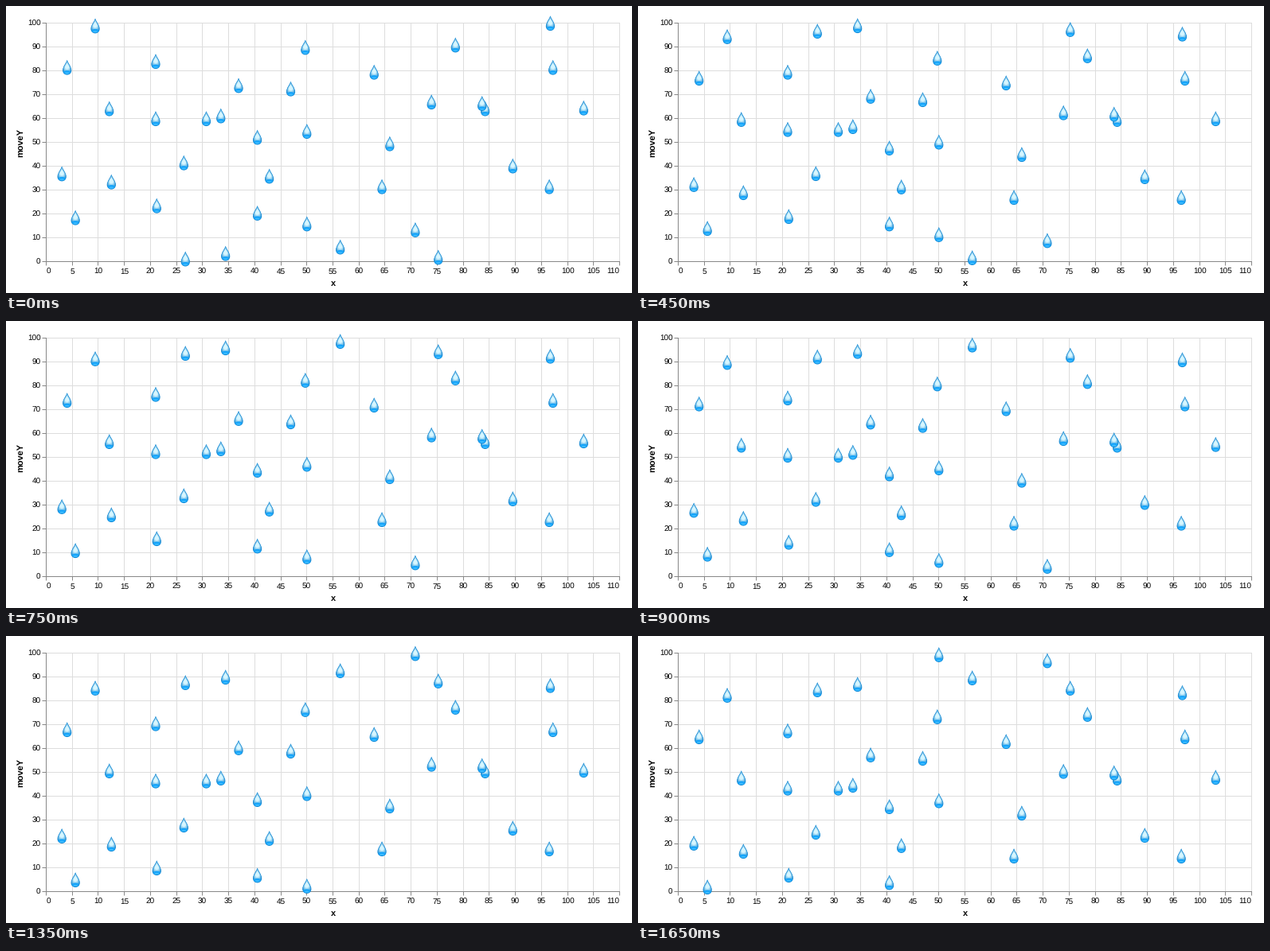
A matplotlib script for the animation above (1670 ms loop, 786 by 361 pixels).

```python
import numpy as np
import matplotlib.pyplot as plt
from matplotlib.animation import FuncAnimation
from matplotlib.collections import LineCollection, PathCollection
from matplotlib.colors import to_rgb
from matplotlib.path import Path
from matplotlib.transforms import Affine2D

W, H, DPI = 786, 361, 100
TICK_MS, STEP_MS, LOOP_MS = 10, 150, 1670
LEFT, RIGHT, TOP, BOTTOM = 50.5, 770.5, 21.5, 321.5
X_MAX, Y_MAX = 110, 100
FALL = 1.5  # y units lost in each step

# Where each drop starts, in chart units
DROPS = np.array([
    (3.0, 36.7), (4.0, 81.3), (5.6, 18.3), (9.4, 98.7), (12.1, 64.0), (12.5, 33.3),
    (21.0, 83.8), (21.0, 59.8), (21.2, 23.3), (26.4, 41.3), (26.7, 1.0), (30.7, 59.8),
    (33.5, 61.0), (34.4, 3.3), (36.9, 73.7), (40.5, 52.0), (40.5, 20.2), (42.8, 35.7),
    (46.9, 72.3), (49.7, 89.7), (50.0, 54.5), (50.0, 15.7), (56.4, 6.0), (62.9, 79.3),
    (64.4, 31.3), (65.9, 49.3), (70.8, 13.2), (73.9, 66.8), (75.2, 1.7), (78.5, 90.7),
    (84.2, 64.0), (83.6, 66.2), (89.5, 40.0), (96.5, 31.3), (96.7, 99.8), (97.2, 81.3),
    (103.1, 64.3)])

plt.rcParams["font.family"] = "Liberation Sans"
plt.rcParams["text.hinting"] = "none"
plt.rcParams["toolbar"] = "None"

fig = plt.figure(figsize=(W / DPI, H / DPI), dpi=DPI, facecolor="white")
ax = fig.add_axes([0, 0, 1, 1])
ax.set_xlim(0, W)
ax.set_ylim(H, 0)
ax.axis("off")


def to_x(v):
    return LEFT + v * (RIGHT - LEFT) / X_MAX


def to_y(v):
    return BOTTOM - v * (BOTTOM - TOP) / Y_MAX


def lines(segments, color, z):
    # Ends sit on pixel centres already, so snapping would move them
    ax.add_collection(LineCollection(segments, colors=color, linewidths=72 / DPI,
                                     capstyle="projecting", snap=False, zorder=z),
                      autolim=False)


def label(x, y, text, px=10, ha="center", va="baseline", **style):
    ax.text(x, y, text, fontsize=px * 72 / DPI, color="black", ha=ha, va=va, **style)


def draw_chart():
    grid = []
    axis = [[(LEFT, TOP), (LEFT, BOTTOM)], [(LEFT, BOTTOM), (RIGHT, BOTTOM)]]
    for v in range(0, X_MAX + 1, 5):
        x = np.floor(to_x(v)) + 0.5
        grid.append([(x, TOP), (x, BOTTOM)])
        axis.append([(x, BOTTOM), (x, BOTTOM + 4.5)])
        side = {0: "left", X_MAX: "right"}.get(v, "center")
        label(x, 336.8, str(v), ha=side)
    for v in range(0, Y_MAX + 1, 10):
        y = to_y(v)
        grid.append([(LEFT, y), (RIGHT, y)])
        axis.append([(LEFT - 4.5, y), (LEFT, y)])
        label(LEFT - 7, y + 3.5, str(v), ha="right")
    lines(grid, "#dddddd", 1)
    lines(axis, "#888888", 2)
    label((LEFT + RIGHT) / 2, 352, "x", 11, weight="bold")
    label(18, (TOP + BOTTOM) / 2, "moveY", 11, weight="bold", rotation=90, va="center")


def drop_path(sx, sy, dy):
    half = np.array([(0, -9.4), (0.9, -6.0), (5.6, -0.8), (5.6, 3.8),
                     (5.6, 7.2), (3.2, 9.5), (0, 9.5)])
    pts = np.vstack([half, half[-2::-1] * (-1, 1)])
    return Path(pts * (sx, sy) + (0, dy), [Path.MOVETO] + [Path.CURVE4] * 12)


def drop_layers(rim="#0f86d2", core="#d6f6ff", count=7):
    """Nested drops, rim to core, sliding up so the blue gathers at the bottom."""
    rim, core = np.array(to_rgb(rim)), np.array(to_rgb(core))
    for t in np.linspace(0, 1, count):
        yield drop_path(1 - 0.55 * t, 1 - 0.6 * t, -1.6 * t), rim + (core - rim) * t
    pool = Path.unit_circle()
    for rx, ry, dy, color in [(4.4, 2.3, 6.3, "#16a4fa"), (2.8, 1.0, 7.3, "#3dbcff")]:
        yield pool.transformed(Affine2D().scale(rx, ry).translate(0, dy)), to_rgb(color)


paths, colors = zip(*drop_layers())


def positions(step):
    """Drop centres at a step; a drop leaving the bottom comes back at the top."""
    x, y = DROPS.T
    y = Y_MAX - (Y_MAX - y + FALL * step) % Y_MAX
    centres = np.column_stack([to_x(x), to_y(y) - 0.5])
    return np.repeat(centres, len(paths), axis=0)


draw_chart()
drops = PathCollection(paths * len(DROPS), facecolors=colors * len(DROPS),
                       edgecolors="none", linewidths=0, offsets=positions(0),
                       offset_transform=ax.transData, zorder=5)
drops.set_transform(Affine2D().scale(1, -1))
ax.add_collection(drops, autolim=False)


def update(i):
    drops.set_offsets(positions(i * TICK_MS // STEP_MS))
    return [drops]


anim = FuncAnimation(fig, update, frames=LOOP_MS // TICK_MS, interval=TICK_MS,
                     repeat=True, repeat_delay=0, blit=False)
plt.show()
```
